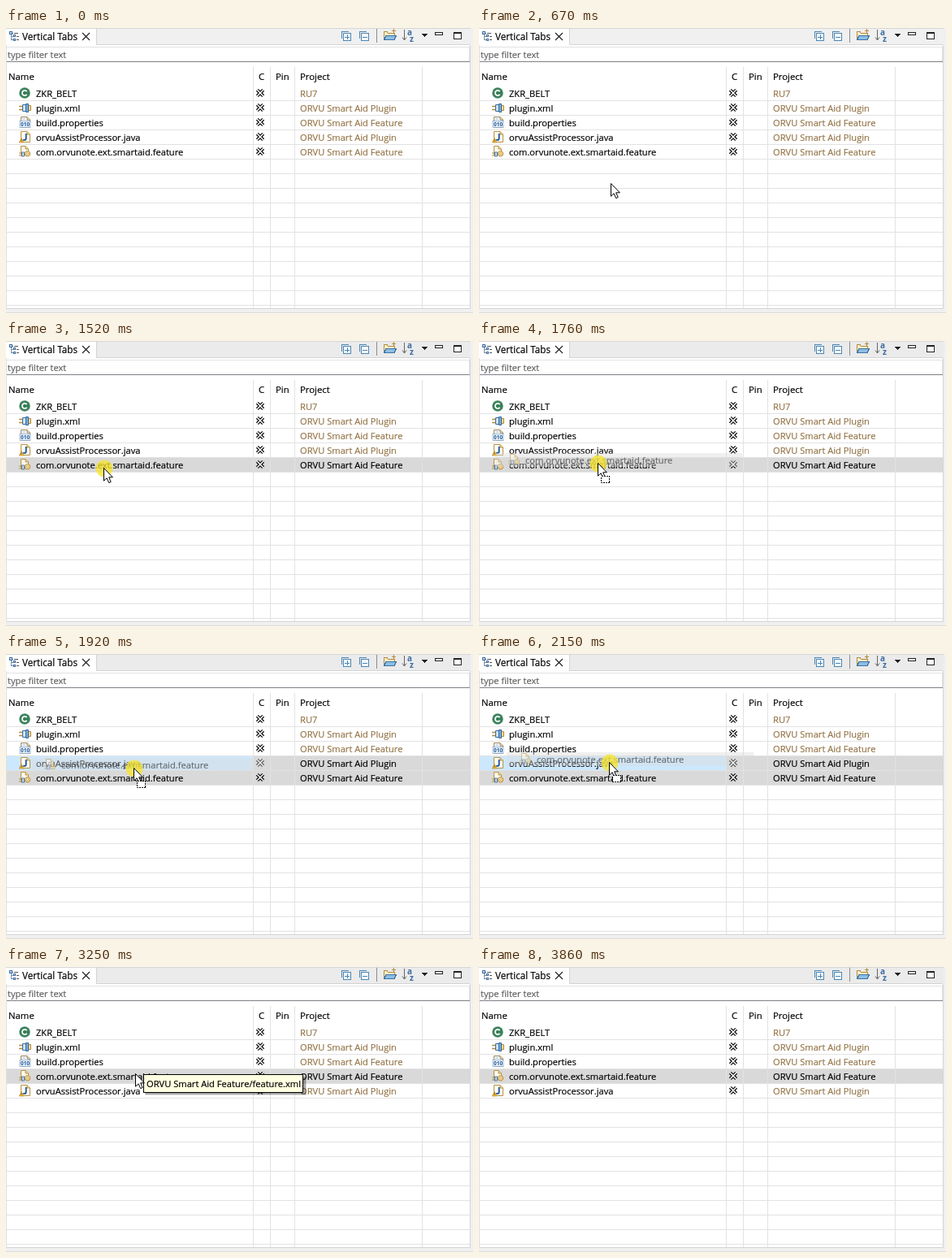
Animation, 575 px wide and 351 px high, one loop 4.33 s. Source, as an HTML page:

```html
<!DOCTYPE html>
<html lang="en">
<head>
<meta charset="utf-8">
<title>Vertical Tabs</title>
<style>
  html, body { margin: 0; width: 100%; height: 100%; overflow: hidden; background: #f0f0f0; }
  svg { display: block; }
  text { font: 11.15px "Open Sans", "Noto Sans", sans-serif; fill: #000; stroke: #000; stroke-width: .18px; white-space: pre; }
  .crisp { shape-rendering: crispEdges; }
  text.soft { fill: #947548; stroke: #947548; }
  text.hint { fill: #5f5f5f; stroke: #5f5f5f; }
  text.icon { font-weight: bold; stroke: none; }
</style>
</head>
<body>
<svg id="stage" width="575" height="351" viewBox="0 0 575 351">
  <defs>
    <g id="class">
      <circle cx="7" cy="7" r="6.8" fill="#4b8a68"/>
      <circle cx="7" cy="7" r="5.8" fill="#388058"/>
      <path d="M9.6 5.2A3.1 3.1 0 1 0 9.6 8.8" fill="none" stroke="#fff" stroke-width="1.8"/>
    </g>
    <g id="plugin">
      <path d="M0 5.5H4M0 9.5H4" stroke="#b98a34" stroke-width="1.6"/>
      <path d="M4.5 3.5H8.5V11.5H4.5Z" fill="#cfe3f7" stroke="#3a6fa3"/>
      <path d="M8.5 2.5H11.5V12.5H8.5Z" fill="#7fb0dd" stroke="#2f6496"/>
      <path d="M12 4.5H14.5V10.5H12" fill="#f6d99a" stroke="#b98a34"/>
    </g>
    <g id="props">
      <path d="M2.5 .5H10L13.5 4V13.5H2.5Z" fill="#f7faff" stroke="#9a875c"/>
      <path d="M10 .5V4H13.5" fill="#e7d9a9" stroke="#9a875c"/>
      <path d="M4 3H8" stroke="#9db8d6"/>
      <rect x="1" y="5.5" width="13" height="8" fill="#edf4fc" stroke="#7f9fc4" stroke-width=".7"/>
      <text class="icon" x="2" y="12.4" style="font-size:6.5px;fill:#215a96">010</text>
    </g>
    <g id="java">
      <path d="M2.5 .5H10L13.5 4V13.5H2.5Z" fill="#fffdf5" stroke="#b49143"/>
      <path d="M10 .5V4H13.5" fill="#f2d488" stroke="#b49143"/>
      <path d="M8.7 3V8.8Q8.7 11 6.6 11Q5.6 11 5 10.4" fill="none" stroke="#275d9b" stroke-width="2"/>
      <path d="M.3 14L3 8.6L5.8 14Z" fill="#f7c23c" stroke="#b8841b" stroke-width=".7"/>
      <path d="M3 10.3V12.8" stroke="#5e430c" stroke-width=".8"/>
    </g>
    <g id="feature">
      <path d="M2.5 .5H8L11.5 4V11.5H2.5Z" fill="#fffaf0" stroke="#b49143"/>
      <path d="M8 .5V4H11.5" fill="#f2d488" stroke="#b49143"/>
      <path d="M0 9H4M0 12H4" stroke="#b98a34" stroke-width="1.2"/>
      <rect x="3.5" y="8" width="3" height="5" fill="#b8d4f0" stroke="#3d6f9f" stroke-width=".8"/>
      <circle cx="10.5" cy="9.8" r="3.2" fill="#fbe3a4" stroke="#b4842f"/>
      <circle cx="10.5" cy="9.8" r="1.2" fill="#fff" stroke="#b4842f" stroke-width=".7"/>
    </g>
    <g id="cross">
      <path d="M1.3 1.3L8.7 8.7M8.7 1.3L1.3 8.7" stroke="#000" stroke-width="4"/>
      <path d="M1.3 1.3L8.7 8.7M8.7 1.3L1.3 8.7" stroke="#fff" stroke-width="1.6"/>
    </g>
  </defs>

  <rect width="575" height="351" fill="#f0f0f0"/>
  <rect id="strip" class="crisp" y="1" width="572" height="20"/>
  <g class="crisp">
    <rect width="572" height="1" fill="#d7d7d7"/>
    <rect y="1" width="111" height="20" fill="#fff"/>
    <path d="M111.5 1V20.5H571" fill="none" stroke="#d4d4d4"/>
    <rect y="21" width="571" height="325" fill="#fff"/>
    <path d="M.5 41V23.5H570.5V41" fill="none" stroke="#e2e2e2"/>
    <rect y="41" width="571" height="1" fill="#7d8288"/>
  </g>

  <g class="crisp" fill="none">
    <path d="M6.5 5V15M6.5 6.5H9M6.5 10.5H10M6.5 14.5H10" stroke="#7890aa"/>
    <rect x="4.5" y="4.5" width="3" height="3" fill="#c6dcf2" stroke="#3d6b9c"/>
    <rect x="9.5" y="8.5" width="2" height="2" fill="#fff" stroke="#3d6b9c"/>
    <rect x="9.5" y="13.5" width="2" height="2" fill="#fff" stroke="#3d6b9c"/>
    <path d="M10 6.5H15M13 10.5H16M13 14.5H16" stroke="#555"/>
  </g>
  <text x="20" y="14.5" style="font-size:11.7px">Vertical Tabs</text>
  <path d="M94 6L103 15M103 6L94 15" stroke="#222" stroke-width="1.2"/>
  <text class="hint" x="2" y="37">type filter text</text>

  <g class="crisp" fill="none">
    <g id="boxes" stroke="#4a86b4"></g>
    <path d="M456.5 1V18" stroke="#8c8c8c"/>
    <path d="M465.5 14.5V4.5H469L470.5 6.5H478.5V9" fill="#fdf1c9" stroke="#b58a3c"/>
    <path d="M465.5 14.5L468 9.5H480.5L478 14.5Z" fill="#8cbde4" stroke="#3c74a6"/>
    <path d="M477.5 1V6M475 3.5H480" stroke="#b58a3c"/>
    <path d="M511 7H519L515 11Z" fill="#222"/>
    <rect x="528.5" y="5.5" width="9" height="3" fill="#fff" stroke="#222"/>
    <rect x="551.5" y="5.5" width="9" height="8" fill="#fff" stroke="#222"/>
    <path d="M551 6.5H561" stroke="#222"/>
  </g>
  <path d="M490.5 2V14M488 11.5L490.5 15L493 11.5" fill="none" stroke="#666"/>
  <text class="icon" x="494" y="9" style="font-size:10px;fill:#3b6da0">a</text>
  <text class="icon" x="497" y="17" style="font-size:10px;fill:#3b6da0">z</text>

  <g id="bands" class="crisp"></g>
  <path id="grid" class="crisp" fill="none" stroke="#e2e2e2"/>
  <g id="heads"></g>
  <g id="rows"></g>

  <g class="crisp">
    <rect y="345" width="572" height="1" fill="#d4d4d4"/>
    <rect y="346" width="575" height="5" fill="#f0f0f0"/>
    <rect x="571" y="21" width="1" height="325" fill="#d4d4d4"/>
    <rect y="21" width="1" height="325" fill="#e0e0e0"/>
    <rect y="350" width="575" height="1" fill="#dcdcdc"/>
  </g>

  <g id="ghost">
    <rect y="144" width="304" height="17" fill="#d9d9d9" opacity=".42"/>
    <g id="ghostRow" opacity=".52"></g>
  </g>
  <circle id="press" r="10.5" fill="#f7e52c" opacity=".76"/>
  <g id="tip">
    <rect x="172" y="136" width="198" height="22" fill="#000" opacity=".13"/>
    <rect x="171" y="135" width="198" height="22" fill="#000" opacity=".25"/>
    <rect x="169.5" y="132.5" width="196" height="22" fill="#ffffe1" stroke="#000" class="crisp"/>
    <text x="173" y="148">ORVU Smart Aid Feature/feature.xml</text>
  </g>
  <g id="cursor">
    <path d="M.5 .5V16.2L4.1 12.8L6.7 18.6L9.2 17.5L6.7 11.8H11.4Z" fill="#fff" stroke="#000"/>
    <rect id="parcel" class="crisp" x="4.5" y="16.5" width="10" height="8" fill="#fff" stroke="#000" stroke-dasharray="2 1"/>
  </g>
</svg>
<script>
const LOOP = 4330, ROW = 18, TOP = 72;
const PLUGIN = "ORVU Smart Aid Plugin", FEATURE = "ORVU Smart Aid Feature";
const items = [
  ["class", "ZKR_BELT", "RU7"],
  ["plugin", "plugin.xml", PLUGIN],
  ["props", "build.properties", FEATURE],
  ["java", "orvuAssistProcessor.java", PLUGIN],
  ["feature", "com.orvunote.ext.smartaid.feature", FEATURE]
];
const $ = id => document.getElementById(id);
const show = (el, on) => el.setAttribute("display", on ? "inline" : "none");
const move = (el, x, y) => el.setAttribute("transform", `translate(${x} ${y})`);

function add(parent, tag, attrs, label) {
  const el = document.createElementNS("http://www.w3.org/2000/svg", tag);
  for (const key in attrs) el.setAttribute(key, attrs[key]);
  if (label) el.textContent = label;
  return parent.appendChild(el);
}

function addName(parent, [icon, name]) {
  add(parent, "use", { href: "#" + icon, x: 16, y: 1 });
  add(parent, "text", { x: 37, y: 13 }, name);
}

// Static parts
[["Name", 3], ["C", 311], ["Pin", 332], ["Project", 362]].forEach(([label, x]) =>
  add($("heads"), "text", { x, y: 64, style: "font-size:11.35px" }, label));

let lines = "";
for (let y = TOP + ROW - .5; y < 345; y += ROW) lines += `M0 ${y}H571`;
for (const x of [304, 325, 355, 512]) lines += `M${x}.5 48V345`;
$("grid").setAttribute("d", lines);

[[413, true], [435, false]].forEach(([x, plus]) => {
  add($("boxes"), "path", { d: `M${x + .5} 13V4.5H${x + 9}` });
  add($("boxes"), "rect", { x: x + 2.5, y: 6.5, width: 9, height: 9, fill: "#f4faff" });
  add($("boxes"), "path", { d: `M${x + 4} 11.5H${x + 10}` + (plus ? `M${x + 7.5} 8V14` : "") });
});

const rows = items.map(item => {
  const g = add($("rows"), "g", {});
  addName(g, item);
  add(g, "use", { href: "#cross", x: 308, y: 3 });
  return { g, project: add(g, "text", { x: 362, y: 13, class: "soft" }, item[2]) };
});
addName($("ghostRow"), items[4]);
move($("ghostRow"), 0, TOP + 4 * ROW);

const band = (x, width) => add($("bands"), "rect", { x, width, height: 17 });
const mainBand = band(0, 571), dropBand = band(0, 304);
dropBand.setAttribute("fill", "#cce8ff");

function paintBand(el, row, fill) {
  show(el, row >= 0);
  el.setAttribute("y", TOP + row * ROW);
  if (fill) el.setAttribute("fill", fill);
}

// Pointer legs: start, end, number of held steps, position by progress
const mix = (a, b, p) => Math.round(a + (b - a) * p);
const line = (x0, y0, x1, y1, ease = p => p) => p => [mix(x0, x1, ease(p)), mix(y0, y1, ease(p))];
const stops = list => p => list[Math.round(p * (list.length - 1))];
const legs = [
  [360, 820, 7, line(466, 312, 125, 177, p => 1 - (1 - p) ** 2)],
  [900, 1130, 4, line(124, 172, 121, 157)],
  [1520, 2000, 7, stops([[121, 157], [127, 157], [138, 153], [147, 151], [153, 146], [158, 141], [159, 138]])],
  [2070, 2230, 3, line(160, 136, 161, 132)],
  [2850, 2850, 1, () => [160, 132]],
  [3480, 3860, 6, line(172, 148, 480, 382, p => p ** 1.1)]
];

function pointer(t) {
  let leg = legs[0];
  for (const l of legs) if (t >= l[0]) leg = l;
  const [start, end, n, path] = leg;
  const gap = (end - start) / (n - 1) || 1;
  const k = Math.min(n - 1, Math.floor((t - start + 6) / gap));
  return path(n > 1 ? Math.max(0, k) / (n - 1) : 0);
}

function draw(t) {
  const [x, y] = pointer(t);
  const pressed = t >= 1520 && t < 2460;
  const dragging = t >= 1680 && t < 2460;
  const dropped = t >= 2460;
  const selected = t < 1520 ? -1 : dropped ? 3 : 4;
  const target = dragging && y < 144 ? 3 : -1;
  const hover = t >= 900 && t < 1520 && y < 162;

  $("strip").setAttribute("fill", t < 1520 ? "#f0f0f0" : "#ebebeb");
  paintBand(mainBand, hover ? 4 : target >= 0 ? target : selected, hover ? "#e5f3ff" : "#d9d9d9");
  mainBand.setAttribute("height", target >= 0 ? 35 : 17);
  paintBand(dropBand, target);

  rows.forEach(({ g, project }, i) => {
    const slot = dropped && i > 2 ? 7 - i : i;
    move(g, 0, TOP + slot * ROW);
    project.setAttribute("class", slot === selected || slot === target ? "" : "soft");
  });

  show($("ghost"), dragging);
  move($("ghost"), x - 127, y - 157);
  show($("press"), pressed);
  move($("press"), x, y);
  show($("tip"), t >= 3250 && t < 3480);
  show($("cursor"), t >= 360 && t < 3860);
  move($("cursor"), x - 1, y - 1);
  show($("parcel"), dragging);
}

function tick() {
  draw(performance.now() % LOOP);
  requestAnimationFrame(tick);
}
tick();
</script>
</body>
</html>
```
